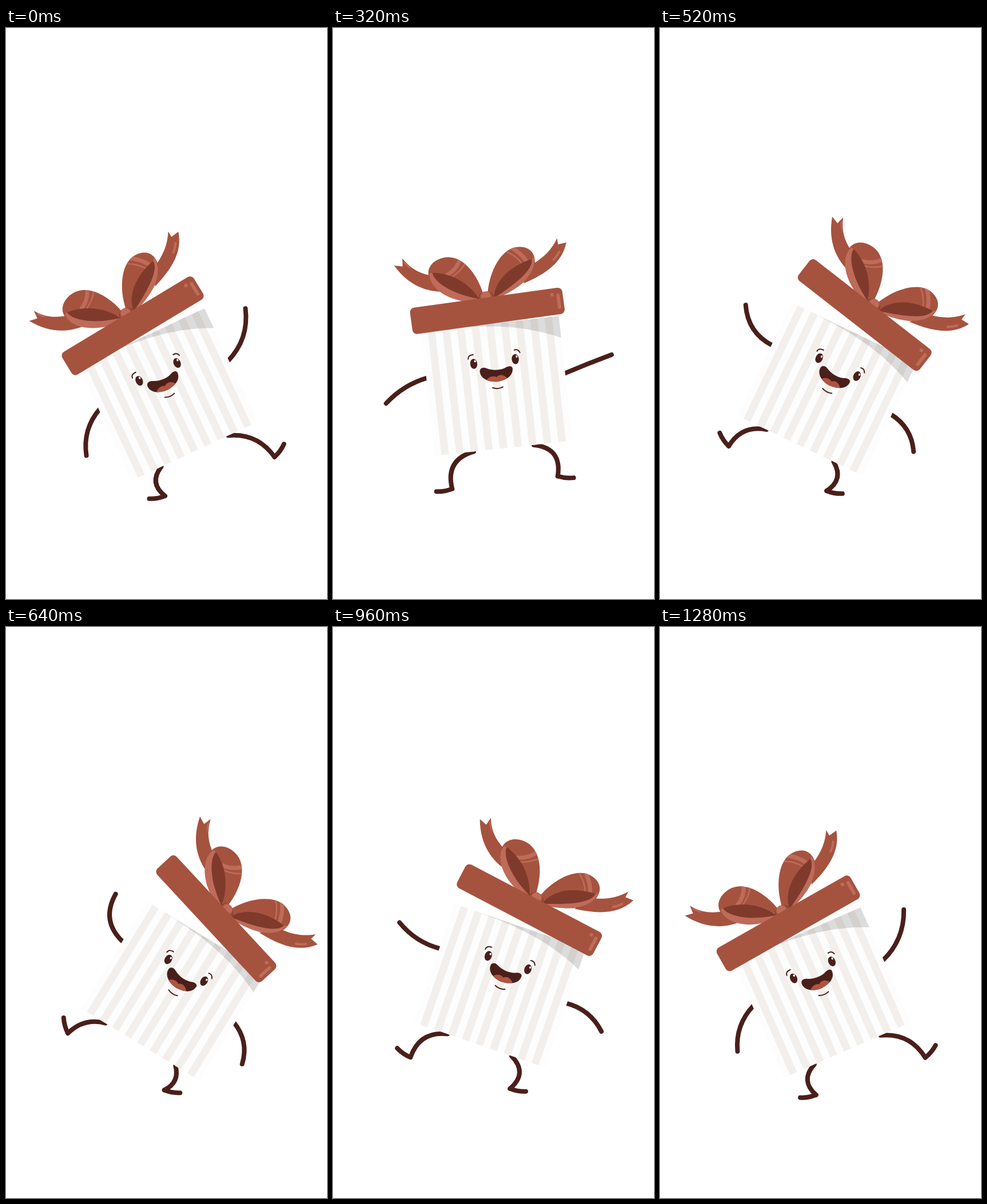
Write an HTML page with a canvas that moves like this. It is 561x998 px and loops after 1.32 s.

```html
<!DOCTYPE html>
<html lang="en">
<head>
<meta charset="utf-8">
<title>Dancing gift box</title>
<style>
  html, body { margin: 0; width: 100%; height: 100%; overflow: hidden; background: #fff; }
  canvas { display: block; }
</style>
</head>
<body>
<canvas id="stage" width="561" height="998"></canvas>
<script>
const ctx = document.getElementById('stage').getContext('2d');
const LOOP = 1320, STEP = 40, DEG = Math.PI / 180;
const DARK = '#4a1f1a', RED = '#a5533f', DEEP = '#803a2c', LIGHT = '#bf6b5a';

// Sway of the body: [time, degrees]; everything else follows from it
const SWAY = [[0, -25], [160, -21.5], [320, -6.3], [520, 25.6], [685, 32], [840, 29.5], [1080, 4], [1280, -23.7]];

// Smooth periodic curve through the sway keys
function swayAt(time) {
  const n = SWAY.length;
  const key = k => {
    const [t, value] = SWAY[(k + n) % n];
    return [t + Math.floor(k / n) * LOOP, value];
  };
  const gap = k => key(k + 1)[0] - key(k)[0];
  const slope = k => (key(k + 1)[1] - key(k)[1]) / gap(k);
  const tangent = k => (slope(k - 1) * gap(k) + slope(k) * gap(k - 1)) / (gap(k - 1) + gap(k));
  let i = n - 1;
  while (key(i)[0] > time) i--;
  const u = (time - key(i)[0]) / gap(i), v = 1 - u;
  return v * v * (1 + 2 * u) * key(i)[1] + u * u * (3 - 2 * u) * key(i + 1)[1]
    + gap(i) * u * v * (v * tangent(i) - u * tangent(i + 1));
}

const quad = (x, a, b, c) => a + b * x + c * x * x;
const polar = (angle, length) => [length * Math.cos(angle * DEG), length * Math.sin(angle * DEG)];

function turn([x, y], angle) {
  const [c, s] = polar(angle, 1);
  return [x * c - y * s, x * s + y * c];
}

function fill(path, color) {
  ctx.fillStyle = color;
  ctx.fill(new Path2D(path));
}

function stroke(path, color, width) {
  ctx.strokeStyle = color;
  ctx.lineWidth = width;
  ctx.stroke(new Path2D(path));
}

function clipped(path, draw) {
  ctx.save();
  ctx.clip(new Path2D(path));
  draw();
  ctx.restore();
}

function placed({ x, y, angle }, draw) {
  ctx.save();
  ctx.translate(x, y);
  ctx.rotate(angle * DEG);
  draw();
  ctx.restore();
}

function oval(x, y, rx, ry, color, angle = 0) {
  ctx.fillStyle = color;
  ctx.beginPath();
  ctx.ellipse(x, y, rx, ry, angle * DEG, 0, 2 * Math.PI);
  ctx.fill();
}

const bodyPose = sway => ({
  x: 287.8 - 1.68 * sway,
  y: quad(sway, 733.2, -0.19, 0.0025),
  angle: sway
});

const lidPose = sway => ({
  x: 289 + 88 * Math.sin(0.035 * sway),
  y: quad(sway, 490.7, -0.39, 0.032),
  angle: quad(sway, 0.5, 1.362, 0.0039)
});

// Line from one point to another, bowed sideways
function bowed([x1, y1], [x2, y2], bend) {
  const dx = x2 - x1, dy = y2 - y1, k = bend / Math.hypot(dx, dy);
  const cx = (x1 + x2) / 2 - dy * k, cy = (y1 + y2) / 2 + dx * k;
  stroke(`M${x1} ${y1}Q${cx} ${cy} ${x2} ${y2}`, DARK, 8);
}

// Limbs are worked out for the right side; lean is the sway seen from that side
function drawArm(lean, bodyY, { shoulder, rest, droop, reach, stretch }) {
  const [x, y] = turn([119, shoulder], lean);
  const raise = rest - droop * lean ** 2 + 2.25 * lean + 0.0005 * lean ** 3;
  const [dx, dy] = polar(raise, reach + stretch * lean);
  bowed([x, bodyY + y], [x + dx, bodyY + y + dy], quad(lean, -7, -0.85, 0.014));
}

function drawLeg(lean, bodyY, { side, floor }) {
  const [hx, hy] = polar(lean, quad(lean, 52, 0, 0.02));
  const heel = [quad(lean, ...side), quad(lean, ...floor)];
  const [tx, ty] = polar(10 - 3.2 * Math.max(0, -lean - 5), 28);
  bowed([hx, bodyY + hy], heel, quad(lean, -37, 0, 0.018));
  bowed(heel, [heel[0] + tx, heel[1] + ty], 3);
}

function drawLimbs(body, mirror, arm, leg) {
  ctx.save();
  ctx.translate(body.x, 0);
  ctx.scale(mirror, 1);
  drawArm(mirror * body.angle, body.y, arm);
  drawLeg(mirror * body.angle, body.y, leg);
  ctx.restore();
}

function drawBox() {
  fill('M-121 -219H121V0H-121Z', '#fdfdfd');
  ctx.fillStyle = '#f2efec';
  for (let i = 0; i < 9; i++) ctx.fillRect(-109.5 + i * 25.7, -219, 13, 219);
  fill('M-121 -219C-40 -219 40 -219 121 -181V-219Z', 'rgba(0,0,0,.13)');
}

function drawFace() {
  for (const [x, y] of [[257, 578], [330, 583]]) {
    oval(x, y, 6.2, 8.8, DARK, 4);
    oval(x + 3, y - 4, 1.6, 2, '#fff');
  }
  stroke('M249 568Q250 561 259 562', DARK, 2);
  stroke('M331 567Q338 566 340 573', DARK, 2);
  stroke('M282 625Q291 630 300 627', DARK, 2);
  const mouth = 'M265 595C265 587 272 586 278 590C288 596 302 598 312 594C318 592 324 594 322 600C320 611 308 616 293 616C276 615 265 605 265 595Z';
  fill(mouth, DARK);
  clipped(mouth, () => fill('M272 612C278 604 288 604 292 608C298 603 306 606 310 613L300 620H278Z', '#ad5542'));
}

function drawLoop(outline, wideBand, thinBand, rim, hollow) {
  fill(outline, RED);
  clipped(outline, () => {
    stroke(wideBand, LIGHT, 7);
    stroke(thinBand, LIGHT, 2.5);
  });
  fill(rim, LIGHT);
  fill(hollow, DEEP);
}

function drawBow() {
  fill('M160 376L174 381L177 367C187 389 200 400 222 410L234 441C198 433 174 410 160 376Z', RED);
  fill('M176 373L181 376Q184 384 189 389L184 386Z', LIGHT);
  fill('M462 408L447 408L448 397C434 414 418 424 395 431L372 460C415 453 447 440 462 408Z', RED);
  stroke('M433 432Q440 428 446 421', LIGHT, 4);
  drawLoop('M300 468C299 425 280 383 246 383C222 383 210 400 216 416C222 445 262 472 300 468Z',
    'M246 414Q266 408 276 390', 'M254 419Q272 413 284 399',
    'M217 404C208 430 245 470 300 474L290 462C260 450 224 430 222 404Z',
    'M222 404C220 416 240 446 291 468C280 438 256 413 222 404Z');
  drawLoop('M305 470C315 430 345 395 372 395C396 396 406 412 400 430C392 455 350 474 305 472Z',
    'M364 392Q380 405 387 424', 'M355 398Q371 409 379 427',
    'M401 418C400 452 355 470 315 475L318 464C345 452 392 444 396 423Z',
    'M396 422C396 440 358 458 315 473C326 441 358 425 396 422Z');
  oval(303, 467, 13, 9, DEEP, 6);
  oval(303, 467, 11.5, 9.5, RED, 6);
  oval(303, 466, 8.5, 8.5, LIGHT, 6);
}

function drawLid() {
  ctx.fillStyle = RED;
  ctx.beginPath();
  ctx.roundRect(-134.3, -23.2, 268.6, 46.4, 8);
  ctx.fill();
  oval(116, -12.3, 3.2, 3.2, LIGHT);
  stroke('M126 -10V11', LIGHT, 6);
}

function drawSparks(time) {
  const ramp = (from, to) => Math.min(1, Math.max(0, (time - from) / (to - from)));
  const head = ramp(680, 800), tail = ramp(840, 920);
  if (head <= tail) return;
  const sparks = [['M260 391Q238 375 213 375', 51], ['M266 381Q260 365 250 353', 33], ['M280 383Q284 358 269 337', 49]];
  for (const [path, length] of sparks) {
    ctx.setLineDash([(head - tail) * length, 200]);
    ctx.lineDashOffset = -tail * length;
    stroke(path, DARK, 3.2);
  }
  ctx.setLineDash([]);
}

function draw(time) {
  const sway = swayAt(time), body = bodyPose(sway), lid = lidPose(sway);
  ctx.fillStyle = '#fff';
  ctx.fillRect(0, 0, 561, 998);
  ctx.lineCap = ctx.lineJoin = 'round';

  drawLimbs(body, 1,
    { shoulder: -118, rest: -7.5, droop: 0, reach: 87, stretch: -0.4 },
    { side: [82, -1.85, 0.018], floor: [791.5, 1.18, -0.0195] });
  drawLimbs(body, -1,
    { shoulder: -137, rest: 18, droop: 0.013, reach: 85, stretch: 0 },
    { side: [100, -1.45, -0.019], floor: [796, 1.7, -0.033] });

  placed(body, drawBox);
  // face and bow are laid out in stage coordinates of a nearly upright pose
  placed({ ...body, angle: sway - 4.1 }, () => {
    ctx.translate(-282, -732.5);
    drawFace();
  });
  placed({ ...lid, angle: lid.angle - 5.8 }, () => {
    ctx.translate(-299.5, -491.5);
    drawBow();
  });
  placed(lid, drawLid);
  drawSparks(time);
}

const start = performance.now();
function frame() {
  const elapsed = (performance.now() - start) % LOOP;
  draw(Math.floor(elapsed / STEP) * STEP);
  requestAnimationFrame(frame);
}
frame();
</script>
</body>
</html>
```
